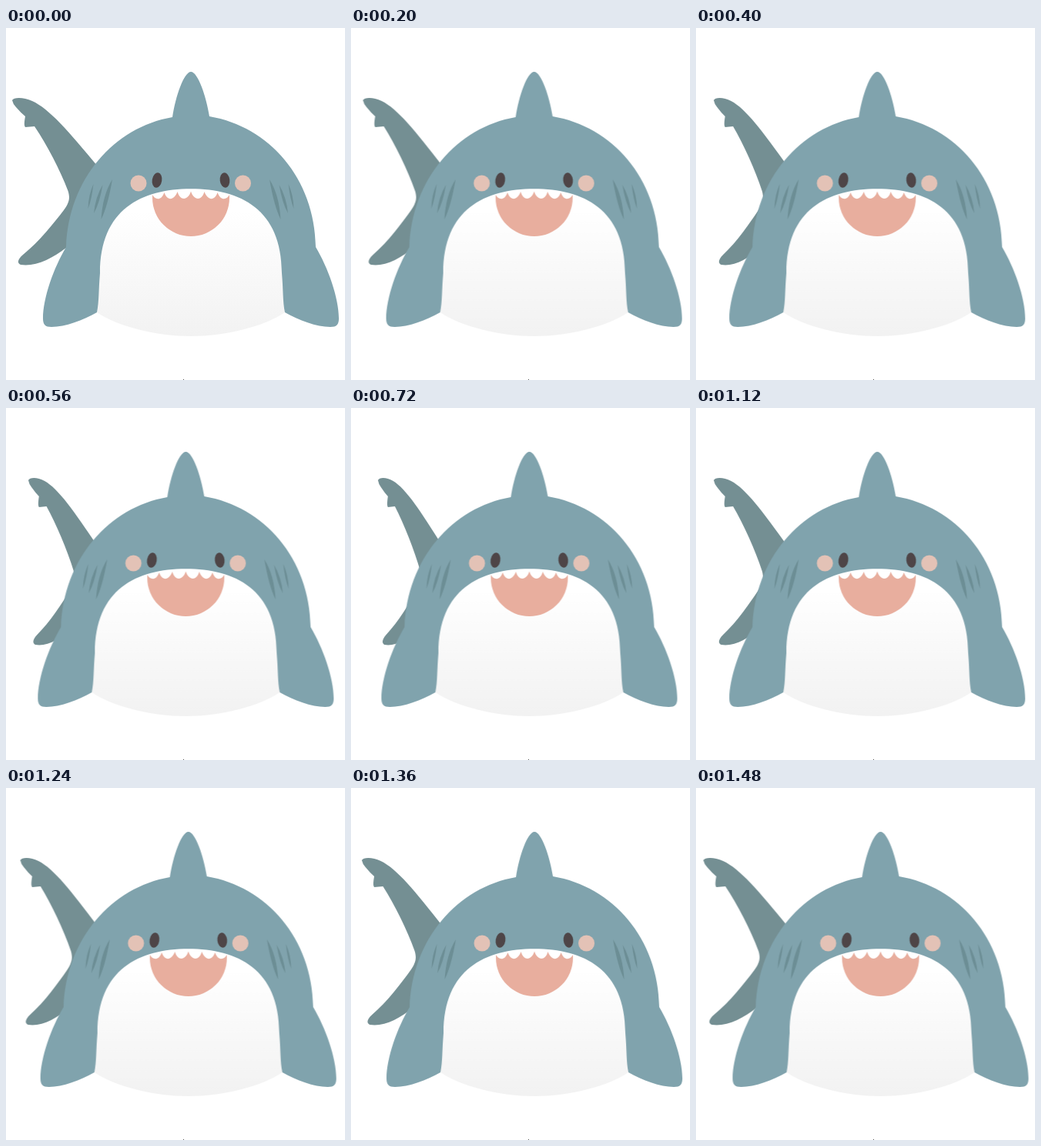
Recreate the animation shown at these times as an HTML page. Size 440 px wide and 458 px high, loop 1.52 s.

```html
<!DOCTYPE html>
<html lang="en">
<head>
<meta charset="utf-8">
<title>Shark</title>
<style>
  html, body { margin: 0; width: 100%; height: 100%; overflow: hidden; background: #fff; }
  svg { display: block; width: 440px; height: 458px; }
  .body, .tail { animation: 1520ms steps(19) infinite; }
  .body { animation-name: sway; }
  .tail { animation-name: swing; transform-origin: 119px 0; }
  @keyframes sway {
    0%, 100% { transform: translateX(0); }
    50% { transform: translateX(-9px); }
  }
  @keyframes swing {
    0%, 100% { transform: scaleX(1); }
    50% { transform: scaleX(.743); }
  }
</style>
</head>
<body>
<svg viewBox="0 0 440 458">
  <defs>
    <linearGradient id="shade" x1="0" y1="0" x2="0" y2="1">
      <stop offset=".15" stop-color="#fff"/>
      <stop offset="1" stop-color="#f2f2f2"/>
    </linearGradient>
    <g id="gills" fill="#6c8e95">
      <path d="M113.500 203Q107 217 106.500 235Q111 224 113.500 203Z"/>
      <path d="M125.500 204Q116 220 114 241Q121.500 228 125.500 204Z"/>
      <path d="M138 197Q125.500 217 123.500 249Q132 232 138 197Z"/>
    </g>
  </defs>

  <path class="tail" fill="#748f93" d="M8 94C10 90 23 90 34 95C56 105 81 134 119 180V260L78 286C60 300 38 311 19 308C14 306 15 301 22 295C43 278 62 254 75 237C83 226 83 220 80.500 212C70 184 53 152 37 128L25 129C23 127 24 121 25 115Q19 110 13 103Q9 99 8 94Z"/>

  <g class="body">
    <path fill="#80a3ad" d="M216 116C220 89 231 57 240 57S260 89 264 115C341.500 128 401 196 402 285C418 312 432 351 432 378C432 386 429 389 421 389C403 389 380 380 362 370H118C100 380 77 389 59 389C51 389 48 386 48 378C48 351 62 312 78 285C81 197 140 129 216 116Z"/>
    <path fill="url(#shade)" d="M118 370C121 355 120 342 122 319C122 236 176 209.300 240 209.300S358 236 358 319C360 342 359 355 362 370C336 388 285 401 240 401S144 388 118 370Z"/>

    <path fill="#e8ae9e" d="M190 217C193 223 201 226 205.500 214C209 225 218 225 222.500 213C226 225 236 225 240 212.500C244 225 254 225 257.500 213C262 225 271 225 274.500 214C279 226 287 223 290 217V221A50 50 0 0 1 190 221Z"/>

    <g fill="#e3c2b6">
      <circle cx="172" cy="202" r="10.500"/>
      <circle cx="307.500" cy="202" r="10.500"/>
    </g>
    <g fill="#4e4547">
      <ellipse cx="196" cy="198" rx="6.300" ry="9.800" transform="rotate(9 196 198)"/>
      <ellipse cx="284" cy="198" rx="6.300" ry="9.800" transform="rotate(-6 284 198)"/>
    </g>
    <use href="#gills"/>
    <use href="#gills" transform="matrix(-1 0 0 1 480 0)"/>
  </g>

  <rect x="230" y="457" width="1" height="1" fill="#555"/>
</svg>
</body>
</html>
```
